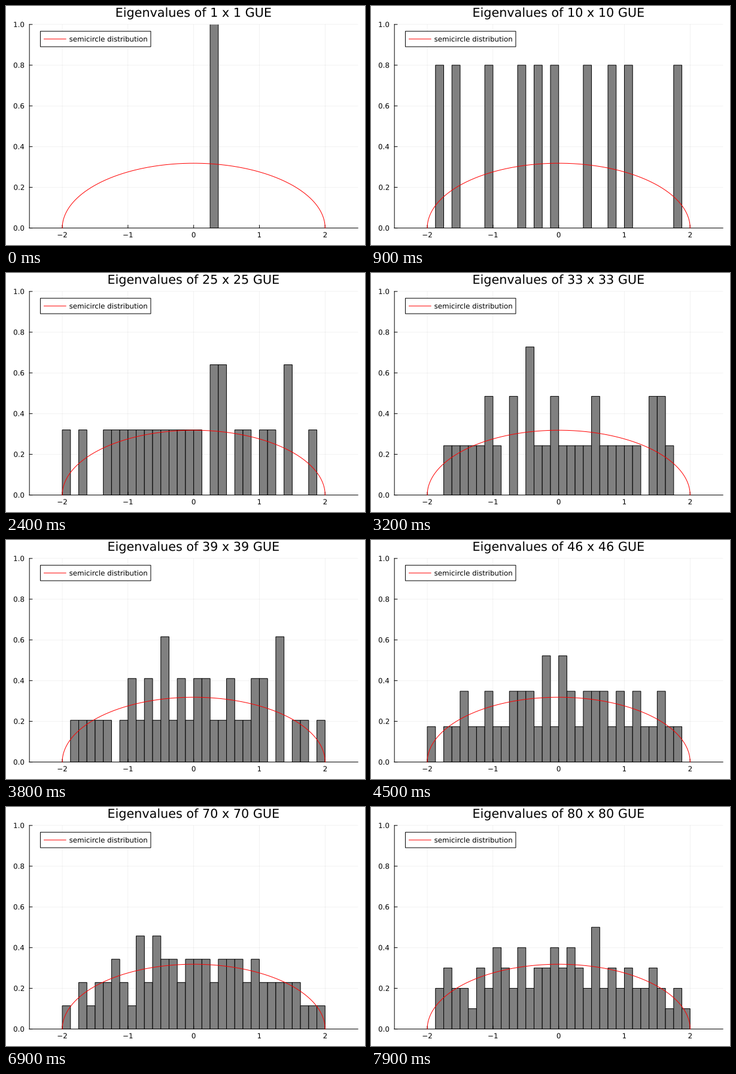
A matplotlib script for the animation above (8 s loop, 600x400 px).

```python
import numpy as np
import matplotlib.pyplot as plt
from matplotlib.animation import FuncAnimation
from matplotlib.patches import PathPatch, Rectangle
from matplotlib.textpath import TextPath
from matplotlib.transforms import Affine2D

W, H, DPI = 600, 400, 100
FRAMES, STEP_MS = 80, 100
PX = 72 / DPI                      # points per pixel
LEFT, RIGHT, TOP, BASE = 39.15, 588.19, 30.87, 371.61
TICK = 4.73
SMALL, LARGE = 11.85, 20.74        # font sizes in pixels
BIN = 0.125
EDGES = np.linspace(-2.5, 2.5, 41)
SEED = 41


def sx(x):
    return LEFT + (x + 2.5) / 5 * (RIGHT - LEFT)


def sy(y):
    return BASE - y * (BASE - TOP)


def gue_eigenvalues(n):
    """Eigenvalues of an n x n GUE matrix, scaled to fill [-2, 2]."""
    rng = np.random.default_rng(SEED + n)
    a = rng.normal(size=(n, n)) + 1j * rng.normal(size=(n, n))
    return np.linalg.eigvalsh((a + a.conj().T) / 2) / np.sqrt(n)


def densities(n):
    return np.histogram(gue_eigenvalues(n), EDGES)[0] / (n * BIN)


def text_path(x, y, s, size=SMALL, anchor=0.5):
    """Outlines of s on baseline y; anchor 0, 0.5, 1 = left, centre, right."""
    path = TextPath((0, 0), s, size=size, prop={"family": "DejaVu Sans"})
    box = path.get_extents()
    shift = x - (box.x0 + anchor * box.width)
    return path.transformed(Affine2D().scale(1, -1).translate(shift, y))


fig = plt.figure(figsize=(W / DPI, H / DPI), dpi=DPI, facecolor="white")
ax = fig.add_axes([0, 0, 1, 1])
ax.set_xlim(0, W)
ax.set_ylim(H, 0)
ax.axis("off")


def line(xs, ys, color="black", width=1, z=5, **kw):
    ax.plot(xs, ys, color=color, lw=width * PX, zorder=z, snap=False, **kw)


def box(x, y, w, h, fill, z):
    return ax.add_patch(Rectangle((x, y), w, h, fc=fill, ec="black", lw=PX,
                                  snap=False, zorder=z))


def label(*args, **kw):
    return ax.add_patch(PathPatch(text_path(*args, **kw), fc="black", lw=0,
                                  snap=False, zorder=8))


# Grid, ticks and tick labels
for v in range(-2, 3):
    x = sx(v)
    line([x, x], [TOP, BASE], width=0.5, alpha=0.1, z=1)
    line([x, x], [BASE, BASE - TICK])
    label(x, 387.2, str(v).replace("-", "\u2212"))
for v in np.linspace(0, 1, 6):
    y = sy(v)
    line([LEFT, RIGHT], [y, y], width=0.5, alpha=0.1, z=1)
    line([LEFT, LEFT + TICK], [y, y])
    label(LEFT - 9, y + 4.32, f"{v:.1f}", anchor=1)
line([LEFT, LEFT], [TOP, BASE])
line([LEFT, RIGHT], [BASE, BASE])

# Histogram bars
plot_area = Rectangle((LEFT, TOP), RIGHT - LEFT, BASE - TOP + 0.5,
                      transform=ax.transData)
bars = [box(sx(e), BASE, sx(BIN) - sx(0), 0, "#808080", 3)
        for e in EDGES[:-1]]
for bar in bars:
    bar.set_clip_path(plot_area)

# Semicircle density
t = np.linspace(np.pi, 0, 400)
line(sx(2 * np.cos(t)), sy(np.sin(t) / np.pi), "red", z=6)

# Legend
box(57.45, 42.23, 184.5, 25.92, "white", 7)
line([63.55, 100.15], [55.19, 55.19], "red", z=8)
label(106.25, 59.51, "semicircle distribution", anchor=0)

title = label(0, 0, "Eigenvalues", LARGE)


def update(i):
    n = i + 1
    title.set_path(text_path((LEFT + RIGHT) / 2, 18.14,
                             f"Eigenvalues of {n} x {n} GUE", LARGE))
    for bar, d in zip(bars, densities(n)):
        top = sy(min(d, 1.1))
        bar.set_y(top)
        bar.set_height(BASE - top)
        bar.set_visible(d > 0)
    return [title, *bars]


anim = FuncAnimation(fig, update, frames=FRAMES, interval=STEP_MS,
                     repeat=True, repeat_delay=0, blit=False)
plt.show()
```
